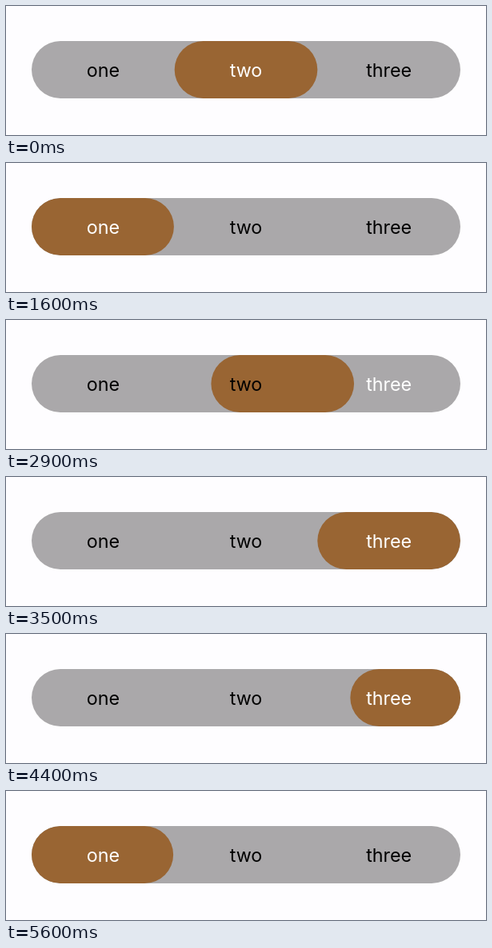
An HTML page with a canvas for the animation above (5.7 s loop, 600 px wide and 162 px high).

```html
<!DOCTYPE html>
<html lang="en">
<head>
<meta charset="utf-8">
<title>Segmented control</title>
<style>
  html, body { margin: 0; width: 100%; height: 100%; overflow: hidden; background: #fefdff; }
  canvas { display: block; }
</style>
</head>
<body>
<canvas id="stage" width="600" height="162"></canvas>
<script>
const ctx = document.getElementById('stage').getContext('2d');

const LOOP = 5700, STEP = 100;
const BAR = { x: 32, y: 44, w: 536, h: 72 };
const LABELS = ['one', 'two', 'three'];
const SEGMENT = BAR.w / LABELS.length;

// Each tap starts a spring towards another segment.
const START = 1;
const TAPS = [
  { at: 1073, to: 0 },
  { at: 2077, to: 1 },
  { at: 2860, to: 2 },
  { at: 3538, to: 0 },
  { at: 4260, to: 2 },
  { at: 5085, to: 0 }
];

const RESPONSE = 0.3, DAMPING = 0.5;
const OMEGA = 2 * Math.PI / RESPONSE;
const ROOT = Math.sqrt(1 - DAMPING * DAMPING);

function spring(seconds) {
  const phase = OMEGA * ROOT * seconds;
  const decay = Math.exp(-DAMPING * OMEGA * seconds);
  return 1 - decay * (Math.cos(phase) + DAMPING / ROOT * Math.sin(phase));
}

function stateAt(ms) {
  let selected = START, position = START;
  for (const tap of TAPS) {
    if (ms < tap.at) break;
    position = selected + (tap.to - selected) * spring((ms - tap.at) / 1000);
    selected = tap.to;
  }
  return { selected, position };
}

function pill(x, w) {
  ctx.beginPath();
  ctx.roundRect(x, BAR.y, w, BAR.h, BAR.h / 2);
}

function draw(ms) {
  const { selected, position } = stateAt(ms);

  ctx.fillStyle = '#fefdff';
  ctx.fillRect(0, 0, 600, 162);

  ctx.save();
  pill(BAR.x, BAR.w);
  ctx.fillStyle = '#aaa8aa';
  ctx.fill();
  ctx.clip();
  pill(BAR.x + position * SEGMENT, SEGMENT);
  ctx.fillStyle = '#996533';
  ctx.fill();
  ctx.restore();

  ctx.font = '23.3px Inter, sans-serif';
  ctx.textAlign = 'center';
  LABELS.forEach((label, i) => {
    ctx.fillStyle = i === selected ? '#fff' : '#000';
    ctx.fillText(label, BAR.x + (i + 0.5) * SEGMENT, 89);
  });
}

const origin = performance.now();

function tick() {
  const ms = (performance.now() - origin) % LOOP;
  draw(Math.floor(ms / STEP) * STEP);
  requestAnimationFrame(tick);
}
tick();
</script>
</body>
</html>
```
